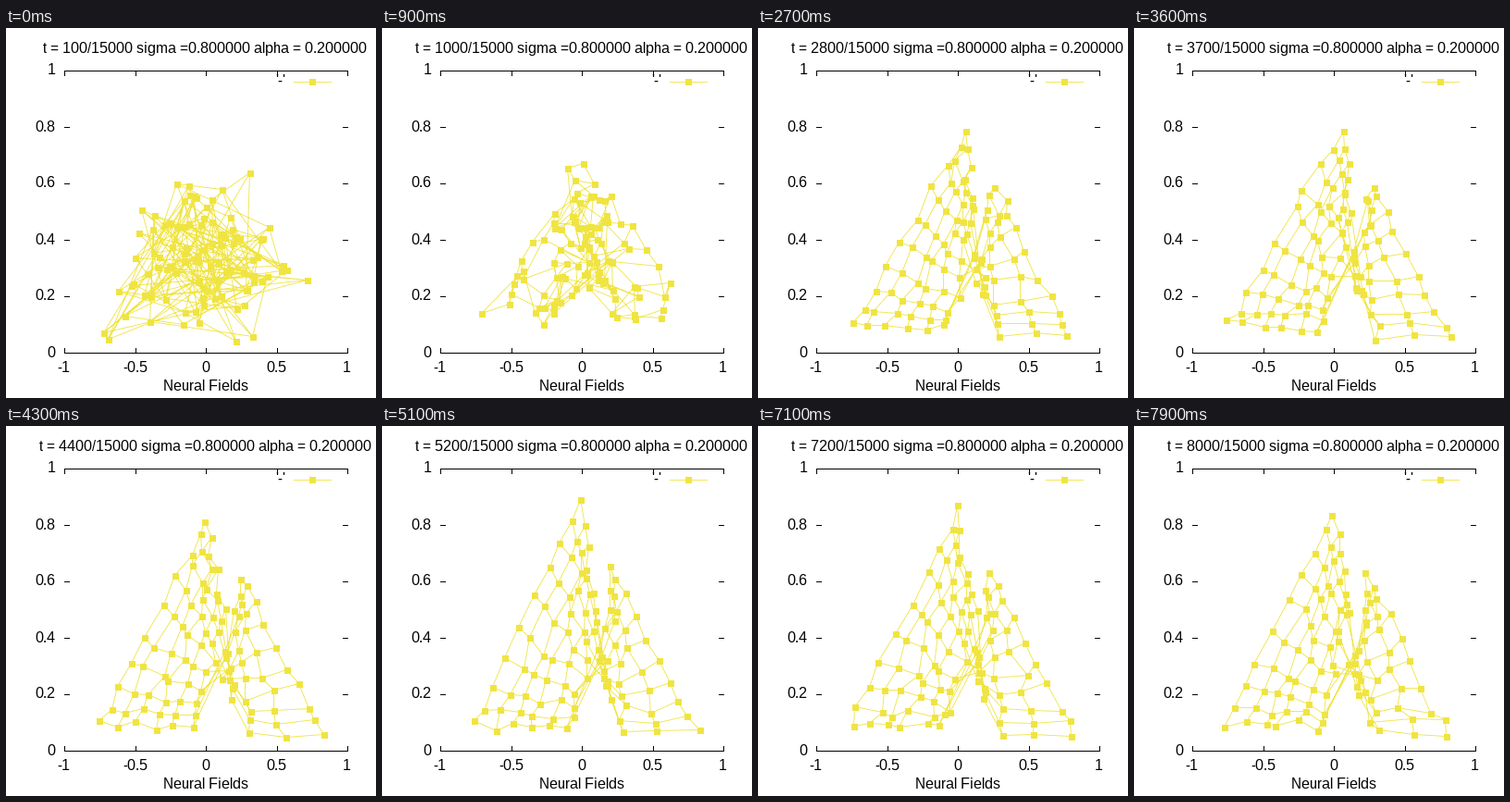
Recreate the animation shown at these times as a matplotlib script. Size 400 px wide and 400 px high, loop 8 s.

```python
import numpy as np
import matplotlib.pyplot as plt
from matplotlib.animation import FuncAnimation

# Whole-pixel glyph advances
plt.rcParams["text.hinting"] = "default"
plt.rcParams["text.hinting_factor"] = 1

FRAMES, INTERVAL = 80, 100
N = 10
UNFOLD = 22  # frames until the tangle is gone
YELLOW = "#f0e442"
PX = 0.72    # points per pixel at 100 dpi
LEFT, RIGHT, TOP, BOTTOM = 62, 368, 45, 350

rng = np.random.default_rng(12)
STEP = np.arange(N)

# The sheet is twisted: each guide column runs from row 0 to row 9
GUIDES = [0, 5, 6, 7, 9]
STARTS = np.array([(99, 321), (200, 325), (236, 242), (247, 196), (256, 172)], float)
ENDS = np.array([(224, 112), (233, 198), (245, 290), (262, 330), (338, 334)], float)
APEX_RISE = np.array([-10, -30])
SIDE_RISE = np.array([-10, -22])


def sheet_at(i):
    lift = np.interp(i, [36, 51, 79], [0, 1, 0.6])
    starts, ends = STARTS.copy(), ENDS.copy()
    ends[0] += lift * APEX_RISE
    starts[-1] += lift * SIDE_RISE
    t = STEP / (N - 1)
    s = (t - 0.05 * np.sin(2 * np.pi * t))[:, None, None]
    guides = starts * (1 - s) + ends * s
    return np.array([[np.interp(STEP, GUIDES, row[:, k]) for k in (0, 1)]
                     for row in guides]).swapaxes(1, 2)


def random_cloud():
    h = rng.beta(2, 3.6, (N, N)) * 0.85
    x = rng.uniform(-1, 1, (2, N, N)).mean(axis=0) * (1 - h)
    return np.stack([215 + 153 * x, BOTTOM - 305 * (h + 0.02)], axis=-1)


def wander(rho=0.75, size=3):
    """Jitter of the nodes as they chase random samples."""
    steps = rng.normal(0, size, (FRAMES, N, N, 2))
    out = [steps[0]]
    for s in steps[1:]:
        out.append(rho * out[-1] + np.sqrt(1 - rho ** 2) * s)
    return np.array(out)


CLOUD = random_cloud()
PACE = rng.uniform(1.8, 3.5, (N, N, 1))
JITTER = wander()


def nodes_at(i):
    mix = max(0, 1 - i / UNFOLD) ** PACE
    p = sheet_at(i) * (1 - mix) + CLOUD * mix + JITTER[i]
    return np.round(np.clip(p, (95, 79), (343, 338)))


def mesh_path(p):
    gap = np.full((N, 1, 2), np.nan)
    rows = np.concatenate([p, gap], axis=1).reshape(-1, 2)
    cols = np.concatenate([p.swapaxes(0, 1), gap], axis=1).reshape(-1, 2)
    return np.concatenate([rows, cols]).T


fig = plt.figure(figsize=(4, 4), dpi=100, facecolor="white")
ax = fig.add_axes([0, 0, 1, 1])
ax.set_xlim(-0.5, 399.5)
ax.set_ylim(399.5, -0.5)
ax.axis("off")


def label(x, y, s, ha="center"):
    return ax.text(x, y, s, ha=ha, va="baseline", family="Liberation Sans",
                   fontsize=16 * PX, color="black")


def stroke(x0, y0, x1, y1):
    ax.plot([x0, x1], [y0, y1], color="black", lw=PX, antialiased=False)


STYLE = dict(color=YELLOW, lw=0.85 * PX, marker="s", ms=7 * PX, mew=0)

for y in (TOP, BOTTOM):
    stroke(LEFT, y, RIGHT, y)
for v in (-1, -0.5, 0, 0.5, 1):
    x = np.floor(LEFT + (v + 1) / 2 * (RIGHT - LEFT) + 0.5)
    stroke(x, BOTTOM, x, BOTTOM - 5)
    stroke(x, TOP, x, TOP + 5)
    label(x, 371, f"{v:g}")
for v in (0, 0.2, 0.4, 0.6, 0.8, 1):
    y = round(BOTTOM - v * (BOTTOM - TOP))
    stroke(LEFT, y, LEFT + 5, y)
    stroke(RIGHT, y, RIGHT - 5, y)
    label(53, y + 5, f"{v:g}", "right")

label(215, 392, "Neural Fields")
label(302, 61, "'-'", "right")
ax.plot([310, 330, 350], [57, 57, 57], markevery=[1], **STYLE)
title = label(215, 27, "")
mesh, = ax.plot([], [], **STYLE)


def draw(i):
    title.set_text(f"t = {100 * (i + 1)}/15000 sigma =0.800000 alpha = 0.200000")
    mesh.set_data(*mesh_path(nodes_at(i)))
    return title, mesh


anim = FuncAnimation(fig, draw, frames=FRAMES, interval=INTERVAL,
                     repeat=True, repeat_delay=0)
plt.show()
```
